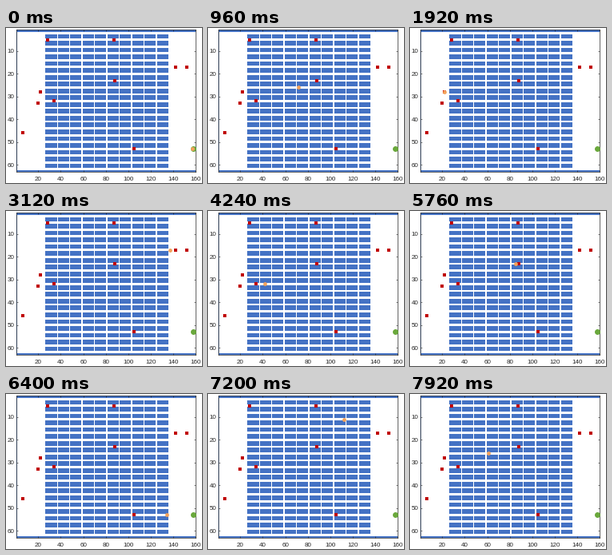
Animation, 245 px wide and 194 px high, one loop 8 s. Source, as a matplotlib script:

```python
import matplotlib.pyplot as plt
from matplotlib.animation import FuncAnimation

WIDTH, HEIGHT, DPI = 245, 194, 100
FRAMES, INTERVAL = 100, 80
PX = 72 / DPI  # one pixel in points
CELLS_X, CELLS_Y = 160, 63
CELL_W, CELL_H = 1.407, 2.841
CELLS_PER_FRAME = 10

BLUE, RED, ORANGE, GREEN, DARK = "#4472c4", "#c00000", "#f4a25a", "#6aa83c", "#262626"
DEPOT, START = (158, 53), (157, 53)

north_west, north, middle, south = (28, 5), (87, 5), (88, 23), (105, 53)
east, far_east = (142, 17), (152, 17)
rack_west, west, far_west, outer_west = (34, 32), (20, 33), (6, 46), (22, 28)
PICKS = [north_west, north, middle, south, east, far_east,
         rack_west, west, far_west, outer_west]
WEST_SIDE = [west, far_west, outer_west, north_west]

# A repeated stop waits for one cell.
STOPS = [START, START, middle, middle, *WEST_SIDE, north, east, far_east,
         rack_west, rack_west, *WEST_SIDE, north_west, south, south, (136, 53),
         far_east, north, north, middle, middle, (61, 26)]


def is_free(x, y):
    """Floor beside the racks, aisles between rows, gaps between columns."""
    inside = 1 < x < CELLS_X and 1 < y < CELLS_Y
    return inside and (x <= 26 or x >= 136 or y % 3 == 2 or x % 11 == 4)


def neighbours(x, y):
    around = [(x + 1, y), (x - 1, y), (x, y + 1), (x, y - 1)]
    return [cell for cell in around if is_free(*cell)]


def distances_to(goal):
    distance, queue = {goal: 0}, [goal]
    for cell in queue:
        for other in neighbours(*cell):
            if other not in distance:
                distance[other] = distance[cell] + 1
                queue.append(other)
    return distance


def shortest_path(start, goal):
    """Slant away from the start, run level, then finish the height near the goal."""
    if start == goal:
        return [goal]
    distance = distances_to(goal)
    span_x, span_y = abs(goal[0] - start[0]), abs(goal[1] - start[1])
    path, (x, y) = [], start
    while (x, y) != goal:
        near_goal = abs(goal[0] - x) < 0.3 * span_x
        height_limit = min(abs(x - start[0]) * 2 / 3, 0.38 * span_y)
        vertical = near_goal or abs(y - start[1]) + 1 <= height_limit
        closer = [c for c in neighbours(x, y) if distance[c] < distance[x, y]]
        x, y = max(closer, key=lambda c: (c[1] != y) == vertical)
        path.append((x, y))
    return path


route = [START]
for start, goal in zip(STOPS, STOPS[1:]):
    route += shortest_path(start, goal)

fig = plt.figure(figsize=(WIDTH / DPI, HEIGHT / DPI), dpi=DPI, facecolor="white")
left, top = 12.87, 2
width, height = (CELLS_X - 0.5) * CELL_W, (CELLS_Y - 0.5) * CELL_H
ax = fig.add_axes([left / WIDTH, 1 - (top + height) / HEIGHT,
                   width / WIDTH, height / HEIGHT])
ax.set_xlim(0.5, CELLS_X)
ax.set_ylim(CELLS_Y, 0.5)


def block(x, y, columns, rows):
    ax.add_patch(plt.Rectangle((x - 0.5, y - 0.5), columns, rows,
                               color=BLUE, linewidth=0))


for y in (1, CELLS_Y):
    block(1, y, CELLS_X, 1)
for x in (1, CELLS_X):
    block(x, 1, 1, CELLS_Y)
for row in range(20):
    for column in range(10):
        block(27 + 11 * column, 3 + 3 * row, 10, 2)

ax.set_xticks(range(20, 161, 20))
ax.set_yticks(range(10, 61, 10))
ax.tick_params(direction="in", length=2 * PX, width=0.6 * PX, color=DARK,
               labelcolor=DARK, labelsize=8 * PX,
               labelfontfamily="Liberation Sans", top=True, right=True)
ax.tick_params(axis="x", pad=6.3 * PX)
ax.tick_params(axis="y", pad=2.5 * PX)
for spine in ax.spines.values():
    spine.set(linewidth=0.7 * PX, color=DARK)


def marker(points, shape, color, size):
    xs, ys = zip(*points)
    return ax.plot(xs, ys, shape, color=color, markersize=size * PX,
                   markeredgewidth=0, clip_on=False, zorder=5)[0]


marker(PICKS, "s", RED, 5)
marker([DEPOT], "o", GREEN, 7)
picker = marker([START], "o", ORANGE, 4.8)


def update(frame):
    x, y = route[min(frame * CELLS_PER_FRAME, len(route) - 1)]
    picker.set_data([x], [y])
    return (picker,)


animation = FuncAnimation(fig, update, frames=FRAMES, interval=INTERVAL,
                          repeat=True, repeat_delay=0)
plt.show()
```
